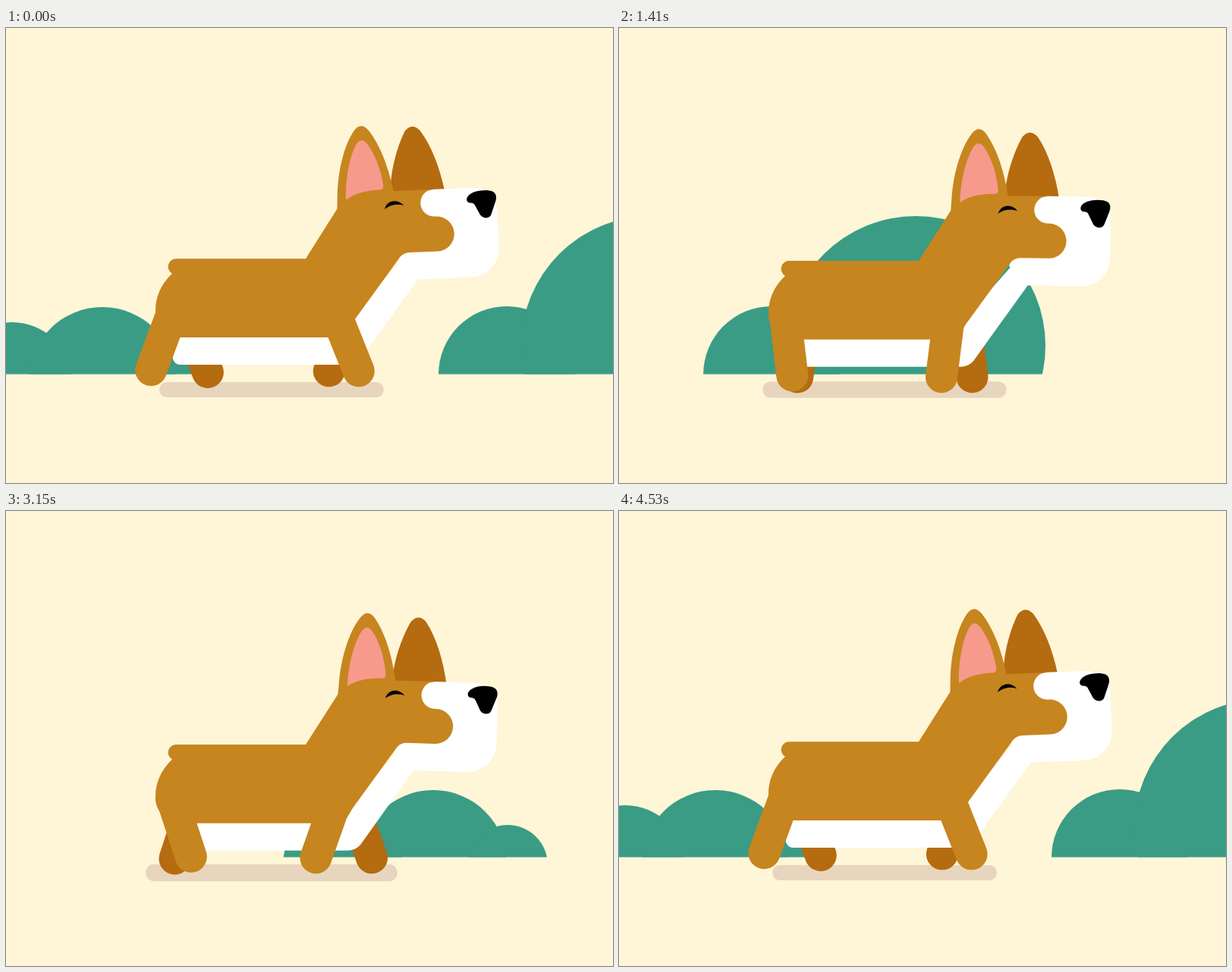
Write an HTML page that moves like this. It is 800 by 600 pixels and loops after 4560 ms.

```html
<!DOCTYPE html>
<html lang="en">
<head>
<meta charset="utf-8">
<title>Walking corgi</title>
<style>
  html, body { margin: 0; width: 100%; height: 100%; overflow: hidden; background: #fff5d7; }
  svg { display: block; width: 100%; height: 100%; }
  .hill { fill: #3a9c85; }
  .coat { fill: #c6851f; }
  .shade { fill: #b56b0f; }
  .white { fill: #fff; }
  .leg { stroke: #c6851f; stroke-width: 42; stroke-linecap: round; }
  .far { stroke: #b56b0f; }
</style>
</head>
<body>
<svg viewBox="0 0 800 600">
  <clipPath id="ground"><rect width="800" height="456.4"/></clipPath>
  <g class="hill" clip-path="url(#ground)">
    <g id="hillA">
      <circle cx="91" cy="457" r="90"/>
      <circle cx="281" cy="419" r="171"/>
    </g>
    <g id="hillB">
      <circle cx="-119" cy="467" r="79"/>
      <circle cx="0" cy="465" r="97"/>
      <circle cx="98" cy="467" r="53"/>
    </g>
  </g>

  <rect id="shadow" x="-147.7" y="-10" width="295.4" height="20" rx="9.5" fill="#e8d5be"/>

  <g id="dog">
    <line id="farBack" class="leg far" x1="243" y1="394" x2="243" y2="460"/>
    <line id="farFront" class="leg far" x1="455.5" y1="380" x2="455.5" y2="460"/>
    <path id="belly" class="white"/>
    <g class="head">
      <path class="shade" d="M509 222 V207 C512 182 522 155 530 141 Q540 130 550 141 C564 161 574 190 579.5 222Z"/>
      <path class="white" d="M535 224 L565 219 H612 Q648 219 648 252 V300 A38 37 0 0 1 610 337 H540 L515 312Z"/>
    </g>
    <path id="trunk" class="coat"/>
    <g class="head">
      <path class="coat" d="M437 240 L438 222 C440 190 449 157 463 138 Q472.5 126 482 138 C498 160 507 190 512 219.5
        L565 219 A18 18 0 0 0 565 255 H567 A23 23 0 0 1 567 301 H530 Q523 301 518 306 L440 300Z"/>
      <path fill="#f79a8c" d="M449 229 C449 205 455 172 466 155 Q472 147 479 155 C490 170 497 192 499 212
        Q499 217 495 217 C475 217 460 221 449 229Z"/>
      <path d="M499.5 243 C503 231 517 229 525 239 C516 236 508 237 499.5 243Z"/>
      <path d="M617 225 C625 222 638 222 643 225 C648 228 647.5 234 646 238 L640 254 C638 261 629 261 625 255
        L619 243 C617 238 614 239 611 238.5 C606 236 607 229 617 225Z"/>
    </g>
    <line id="nearBack" class="leg" x1="219" y1="378" x2="219" y2="458"/>
    <line id="nearFront" class="leg" x1="435" y1="380" x2="435" y2="460"/>
  </g>
</svg>
<script>
  const LOOP = 4560, STEP = 30, STRIDE = 300.5;
  const NECK = { x: 446, y: 255 };
  const $ = id => document.getElementById(id);
  const heads = document.querySelectorAll('.head');

  // [time, x]; two entries at one time make a jump
  const pathA = [[0, 569], [990, 248], [3000, -412], [3000, 1106], [4140, 706], [4530, 569], [LOOP, 569]];
  const pathB = [[0, 127], [1500, -359], [1500, 1094], [3150, 563], [4140, 243.5], [4530, 127], [LOOP, 127]];

  function along(keys, t) {
    const i = keys.findIndex(k => k[0] > t);
    const [t0, x0] = keys[i - 1], [t1, x1] = keys[i];
    return x0 + (x1 - x0) * (t - t0) / (t1 - t0);
  }

  const place = (el, value) => el.setAttribute('transform', value);

  function swing(id, angle) {
    const leg = $(id);
    place(leg, `rotate(${-angle} ${leg.getAttribute('x1')} ${leg.getAttribute('y1')})`);
  }

  function draw(t) {
    place($('hillA'), `translate(${along(pathA, t)})`);
    place($('hillB'), `translate(${along(pathB, t)})`);

    // u runs linearly 1 -> -1 -> 1 over each stride
    const phase = ((t - 11) / STRIDE + 1) % 1;
    const u = 1 - 4 * Math.min(phase, 1 - phase);
    const angle = 3 + 25.5 * u - 4 * u * u;
    const tilt = -2.5 * u;

    place($('shadow'), `translate(350 477) scale(${1.057 - 0.075 * u + 0.01 * u * u})`);
    place($('dog'), `translate(0 ${-2.3 * u})`);
    heads.forEach(h => place(h, `rotate(${tilt} ${NECK.x} ${NECK.y})`));
    swing('nearFront', angle);
    swing('farFront', -angle);
    swing('nearBack', -0.93 * angle);
    swing('farBack', 0.93 * angle);

    // points on the tilted head, joined to the trunk
    const a = tilt * Math.PI / 180, c = Math.cos(a), s = Math.sin(a);
    const onHead = (x, y) => {
      const dx = x - NECK.x, dy = y - NECK.y;
      return `${NECK.x + dx * c - dy * s} ${NECK.y + dx * s + dy * c}`;
    };
    $('belly').setAttribute('d',
      `M225 405 L219 430 Q219 446 230 446 H450 Q460 446 467 438.5 L${onHead(540, 337)} L${onHead(520, 310)} L440 400Z`);
    $('trunk').setAttribute('d',
      `M${onHead(437, 240)} L395 306.2 H224 A10.5 10.5 0 0 0 219 325.8 C203 341 197 358 197 375 V380
       Q200 402 225 410 H445 L457 390 L${onHead(518, 306)} L${onHead(515, 250)}Z`);
  }

  const start = performance.now();
  function tick() {
    const t = Math.max(0, performance.now() - start) % LOOP;
    draw(Math.floor(t / STEP) * STEP);
    requestAnimationFrame(tick);
  }
  tick();
</script>
</body>
</html>
```
